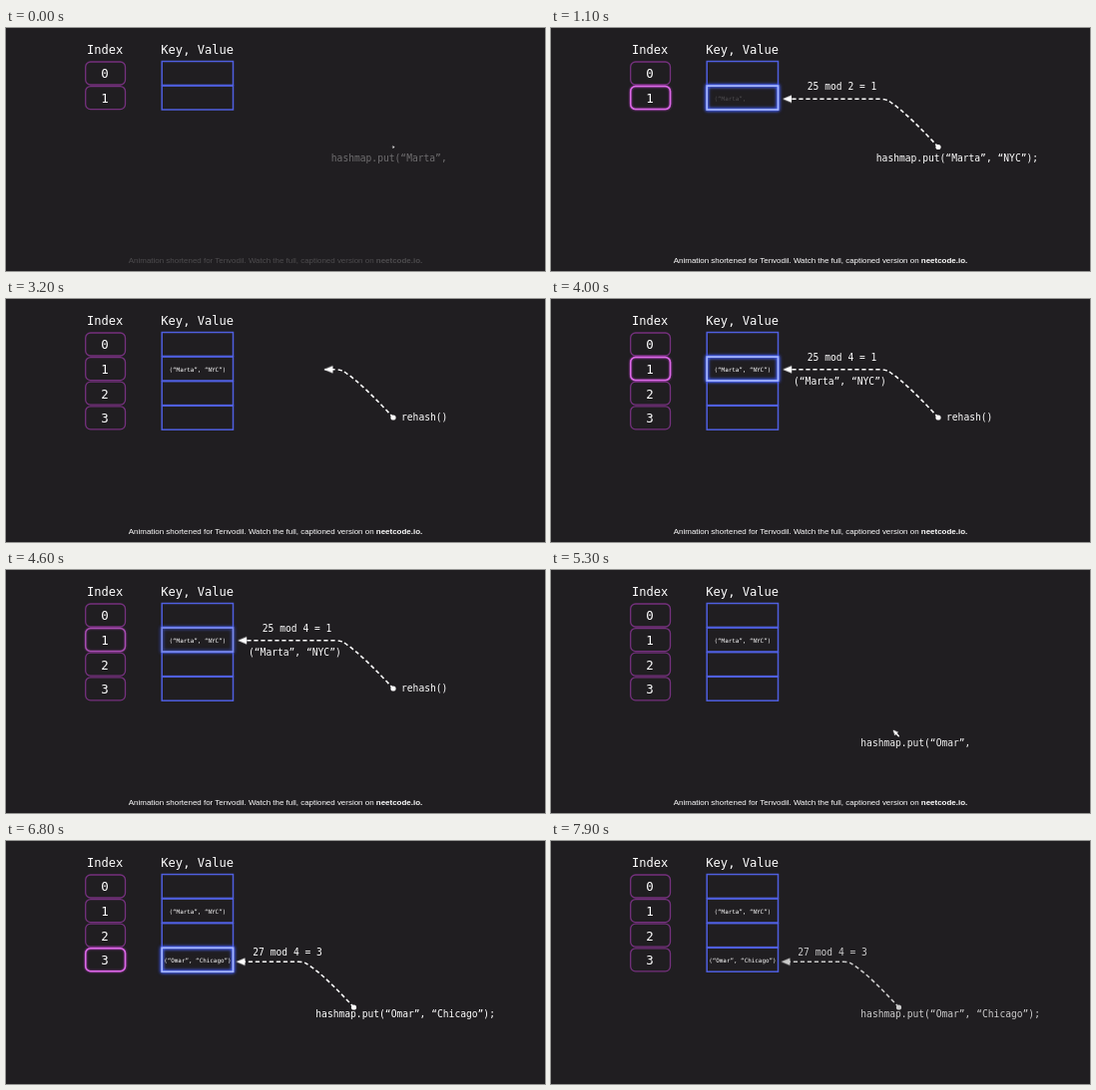
Animation of 540 by 244 pixels, one loop 8 s. Source, as an HTML page:

```html
<!DOCTYPE html>
<html lang="en">
<head>
<meta charset="utf-8">
<title>Hash map resize</title>
<style>
  html, body { margin: 0; width: 100%; height: 100%; overflow: hidden; background: #201e21; }
  svg { display: block; width: 540px; height: 244px; }
  text { fill: #fff; font: 9.63px "DejaVu Sans Mono", "Noto Sans Mono", monospace; white-space: pre; }
  .head { font-size: 12.1px; }
  .digit { font-size: 12.4px; text-anchor: middle; }
  .small { font-size: 5.9px; }
  .footer { font: 7.96px "Liberation Sans", Arial, sans-serif; text-anchor: middle; }
  .footer tspan { font-weight: 700; }
  .index, .cell { fill: none; }
  .index { stroke: #75317e; stroke-width: 1.3; }
  .cell { stroke: #4f5fe0; stroke-width: 1.5; }
  .glow .index { stroke: #dc6ae6; stroke-width: 1.5; filter: drop-shadow(0 0 1.3px #b23cc0); }
  .glow .cell { stroke: #a5b6ff; stroke-width: 1.7; filter: drop-shadow(0 0 1.5px #4a66ff) drop-shadow(0 0 1.5px #3f5cff); }
  .line { fill: none; stroke: #fff; stroke-width: 1.6; stroke-dasharray: 4.2 2.8; }
  .reveal { fill: none; stroke: #fff; stroke-width: 8; stroke-dasharray: 100; }
  .tip, .dot { fill: #fff; }
</style>
</head>
<body>
<svg id="stage" viewBox="0 0 540 244">
  <text class="head" x="81" y="26">Index</text>
  <text class="head" x="155.3" y="26">Key, Value</text>
  <text class="footer" id="footer" x="270" y="236">Animation shortened for Tenvodil. Watch the full, captioned version on <tspan>neetcode.io.</tspan></text>
</svg>
<script>
const LOOP = 8000;
const PITCH = 24.6;
const stage = document.getElementById('stage');

function add(parent, tag, attrs = {}, content = '') {
  const el = document.createElementNS('http://www.w3.org/2000/svg', tag);
  for (const name in attrs) el.setAttribute(name, attrs[name]);
  el.textContent = content;
  return parent.appendChild(el);
}

// Loops one property through [time, value] points at ten pictures a second.
function play(el, prop, points, easing = 'linear') {
  const frames = points.map(([time, value]) =>
    ({ offset: Math.max(0, time) / LOOP, [prop]: value, easing }));
  if (frames[0].offset > 0) frames.unshift({ ...frames[0], offset: 0 });
  frames.push({ ...frames.at(-1), offset: 1 });
  el.animate(frames, { duration: LOOP, iterations: Infinity, delay: -20, easing: 'steps(80)' });
}

// Fades in; a fade that began before the loop starts part way.
function appear(el, prop, from, duration) {
  play(el, prop, [[from, Math.max(0, -from / duration)], [from + duration, 1]]);
}

// Text whose words fade in one after another.
function words(parent, x, y, content, start, step, cls = '') {
  const text = add(parent, 'text', { x, y, class: cls });
  content.split(/(?<= )/).forEach((word, i) =>
    appear(add(text, 'tspan', {}, word), 'fillOpacity', start + i * step, 170));
}

function row(parent, i) {
  const y = i * PITCH;
  add(parent, 'rect', { class: 'index', x: 79.7, y: 34 + y, width: 39.8, height: 23, rx: 5 });
  add(parent, 'rect', { class: 'cell', x: 156.2, y: 33.5 + y, width: 71.3, height: 23.9 });
}

function numberedRow(parent, i) {
  row(parent, i);
  add(parent, 'text', { class: 'digit', x: 99.1, y: 50.4 + i * PITCH }, i);
}

function glow(i, start) {
  const group = add(stage, 'g', { class: 'glow' });
  row(group, i);
  play(group, 'opacity', [
    [start + 850, 0], [start + 1050, 1], [start + 1700, 1], [start + 2100, 0]
  ]);
}

function arrow(parent, start, { x, y, bend, endX, endY }) {
  const curve = `M${x} ${y}C${x - 14} ${y - 15} ${bend + 18} ${endY + 11} ` +
    `${bend + 3} ${endY + 1.8}Q${bend} ${endY} ${bend - 5} ${endY}H`;
  const route = curve + endX;
  const from = Math.max(0, start + 50);
  const to = start + 950;

  const id = 'reveal' + endX;
  const mask = add(parent, 'mask', { id, maskUnits: 'userSpaceOnUse', x: 0, y: 0, width: 540, height: 244 });
  const reveal = add(mask, 'path', { class: 'reveal', d: route, pathLength: 100 });
  play(reveal, 'strokeDashoffset', [[from, '100px'], [to, '0px']], 'ease-in-out');
  add(parent, 'path', { class: 'line', d: curve + (endX + 5), mask: `url(#${id})` });

  const dot = add(parent, 'circle', { class: 'dot', cx: x, cy: y, r: 2.6 });
  play(dot, 'r', [[start + 150, '0px'], [start + 400, '2.6px']]);

  const tip = add(parent, 'path', { class: 'tip', d: 'M0 0L-9 -3.8V3.8Z' });
  tip.style.offsetPath = `path("${route}")`;
  appear(tip, 'opacity', start, 100);
  play(tip, 'offsetDistance', [[from, '1%'], [to, '100%']], 'ease-in-out');
  play(tip, 'transform', [[from, 'scale(.3)'], [start + 400, 'scale(1)']]);
}

// A call, its arrow to a row and the sum above the arrow.
function scene({ start, call, sum, target, route, fade }) {
  glow(target, start);
  const group = add(stage, 'g');
  play(group, 'opacity', fade);
  words(group, ...call, start + 40, 160);
  words(group, ...sum, start + 610, 100);
  arrow(group, start, route);
  return group;
}

numberedRow(stage, 0);
numberedRow(stage, 1);
const grown = add(stage, 'g');
numberedRow(grown, 2);
numberedRow(grown, 3);
play(grown, 'opacity', [[2300, 0], [2700, 1]]);
play(document.getElementById('footer'), 'opacity', [[0, .2], [250, 1], [6000, 1], [6400, 0]]);

scene({
  start: -100,
  call: [325.8, 134.3, 'hashmap.put(“Marta”, “NYC”);'],
  sum: [256.8, 61.5, '25 mod 2 = 1'],
  target: 1,
  route: { x: 388, y: 119.5, bend: 335, endX: 232, endY: 71.3 },
  fade: [[1800, 1], [2100, 0]]
});

const rehash = scene({
  start: 2700,
  call: [396, 122.3, 'rehash()'],
  sum: [256.8, 61.5, '25 mod 4 = 1'],
  target: 1,
  route: { x: 388, y: 119, bend: 335, endX: 232.2, endY: 70.8 },
  fade: [[4600, 1], [4900, 0]]
});
words(rehash, 243, 86, '(“Marta”, “NYC”)', 3400, 160);

scene({
  start: 5100,
  call: [310.3, 177.2, 'hashmap.put(“Omar”, “Chicago”);'],
  sum: [247.3, 114.6, '27 mod 4 = 3'],
  target: 3,
  route: { x: 348.5, y: 167, bend: 298, endX: 230.5, endY: 121.3 },
  fade: [[7700, 1], [7900, .77]]
});

words(stage, 163.5, 73.1, '(“Marta”, “NYC”)', 1065, 160, 'small');
words(stage, 158.2, 122.4, '(“Omar”, “Chicago”)', 6190, 160, 'small');
</script>
</body>
</html>
```
